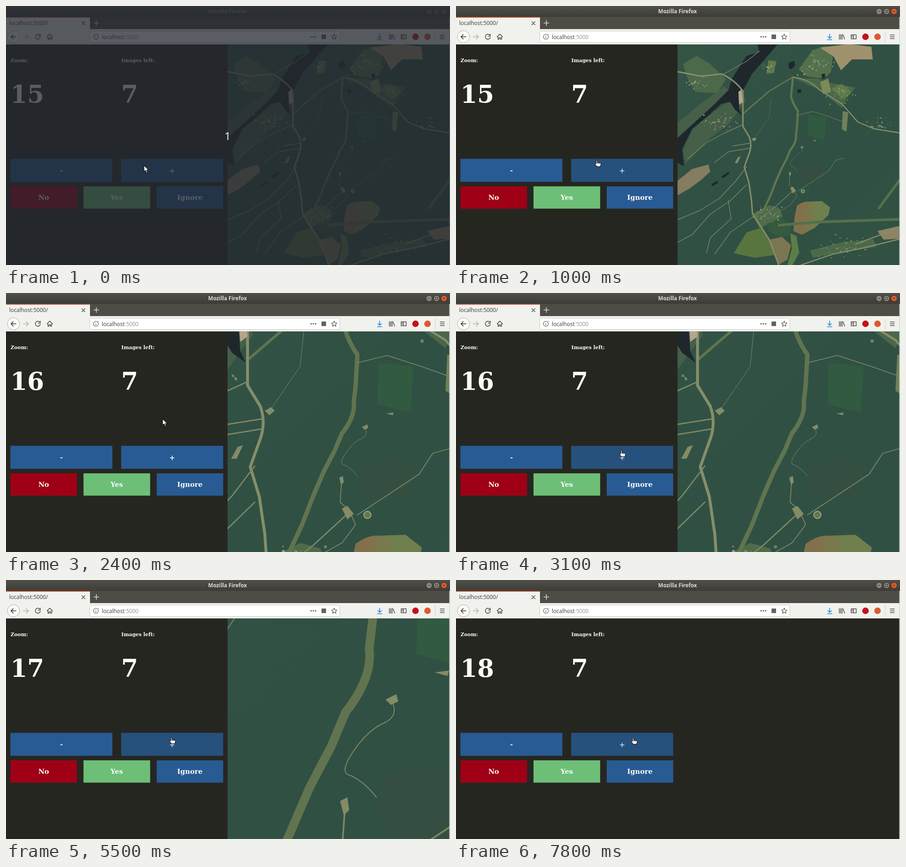
An HTML page for the animation above (8000 ms loop, 978x572 px).

```html
<!DOCTYPE html>
<html lang="en">
<head>
<meta charset="utf-8">
<title>Image labelling</title>
<style>
  html, body { margin: 0; width: 100%; height: 100%; overflow: hidden; background: #262621; }
  svg { display: block; width: 978px; height: 572px; }
  text { font-family: "Open Sans", sans-serif; font-size: 12px; fill: #3a3a36; }
  .page text { font: bold 15px "DejaVu Serif", serif; fill: #fbfbf8; }
  .page .label { font-size: 11px; }
  .page .count { font-size: 53.33px; }
  .mid { text-anchor: middle; }
  .icons, .roads { fill: none; stroke-linecap: round; stroke-linejoin: round; }
  .icons { stroke: #50504c; stroke-width: 1.6; }
  .roads { stroke: #7f8863; stroke-width: 1.4; }
  .cursor { fill: #fff; stroke: #111; stroke-width: 1.1; stroke-linejoin: round; }
</style>
</head>
<body>
<svg viewBox="0 0 978 572">
  <defs>
    <linearGradient id="bar" x2="0" y2="1">
      <stop stop-color="#504f48"/><stop offset="1" stop-color="#3d3c37"/>
    </linearGradient>
    <linearGradient id="forest" x2="1" y2="1">
      <stop stop-color="#345446"/><stop offset=".5" stop-color="#305044"/><stop offset="1" stop-color="#315143"/>
    </linearGradient>
    <linearGradient id="meadow">
      <stop offset=".25" stop-color="#82704c"/><stop offset=".65" stop-color="#70804c"/>
    </linearGradient>
    <clipPath id="pane"><path d="M488 84H977V572H488Z"/></clipPath>
  </defs>

  <path fill="#262621" d="M0 0H978V572H0Z"/>

  <g id="map" clip-path="url(#pane)">
    <g id="land">
      <path fill="url(#forest)" d="M488 84H977V572H488Z"/>
      <path fill="#315a41" d="M776 241L815 245 812 296 775 287Z"/>
      <path fill="#344f41" d="M758 352L790 348 815 356 808 388 764 392 752 374Z"/>
      <path fill="#465f48" d="M488 290V258L540 215 590 178 604 188 560 226ZM632 188L638 210 600 262 562 290 506 348 500 318 522 270 584 222Z"/>
      <path fill="#4c694a" d="M500 128L530 110 560 128 595 162 575 192 528 190 510 160Z"/>
      <path fill="#53704c" d="M755 140L785 98 812 88 830 112 826 145 812 160 775 156Z"/>
      <path fill="#4b674a" d="M745 160L795 160 826 170 880 180 862 202 850 225 800 185Z"/>
      <path fill="#a0916d" d="M802 92L865 84 915 90 918 118 872 118 848 142 832 112Z"/>
      <path fill="#7c8a58" d="M802 168L820 160 826 190 808 194Z"/>
      <path fill="#5d7a47" d="M826 182L850 172 872 190 852 206ZM688 120L706 122 700 148 684 150Z"/>
      <path fill="#70815a" d="M852 232L864 235 860 278 850 272Z"/>
      <path fill="#857d62" d="M488 386L520 360 556 350 560 366 540 384 516 402 488 418Z"/>
      <path fill="url(#meadow)" d="M751 441Q765 431 776 432L806 431 824 445 820 462 790 490 762 505 743 497 746 465Z"/>
      <path fill="#4f6b49" d="M652 460L690 440 712 446 720 465 690 482 668 490Z"/>
      <path fill="#36593f" d="M684 482L715 467 738 483 735 505 715 513 690 498Z"/>
      <path fill="#587540" d="M640 500L672 490 698 532 702 550 658 556 612 546Z"/>
      <path fill="#7b7650" d="M690 516L718 510 738 528 730 560 712 570 700 545Z"/>
      <path fill="#5c7d45" d="M736 502L750 508 756 545 740 574 730 572 740 535Z"/>
      <path fill="#8e8462" d="M928 497L976 486V514L942 516Z"/>
      <path fill="#4c6a4a" d="M780 540L850 522 920 515 926 532 840 545 786 556Z"/>
      <path fill="#1f272c" d="M664 84H709L690 106 652 150 635 182 622 200 624 228 630 241 615 230 604 212 584 216 560 238 520 272 498 316 502 354 488 346V292L530 253 565 221 600 186 608 160 640 110 668 102Z"/>
      <g id="specks"></g>
      <g class="roads">
        <path stroke="#54704c" stroke-width="6" d="M712 484L800 477 976 471M932 446L976 386"/>
        <path stroke="#61744f" stroke-width="4.8" d="M742 158L738 200Q743 218 753 232L751 267 749 284Q751 300 736 319L728 338 716 361 704 389 692 420 678 450 660 462"/>
        <path stroke="#61744f" stroke-width="3" d="M632 238L690 188 742 157"/>
        <path stroke="#858e6a" stroke-width="3.2" d="M488 145L540 155 585 150Q615 164 632 188L632 266 646 289Q653 308 645 328L635 356 645 389 651 430 653 458 690 516 711 572"/>
        <path stroke="#858e6a" stroke-width="2.4" d="M742 157Q780 162 800 185L850 216 885 256 920 271 976 280M760 572L830 548 890 536 976 515M880 526L976 490"/>
        <path d="M590 150L640 122 668 100M632 262L590 281 550 303 510 338M610 309L648 303M648 314L600 322 570 345M640 355L615 388 580 425 536 452 488 472M640 395L604 430 560 460 520 505 488 522M600 430L606 470 560 512 552 545M655 465L604 500 570 548M670 470L705 442 742 408"/>
        <path stroke-width=".9" d="M753 241L786 233 826 246 854 256M753 409L791 384 821 364 836 341 854 336M736 367L734 395 744 404 751 420 736 440 700 460"/>
        <path stroke-width=".5" d="M761 312Q766 321 757 325T740 341 739 354Q747 358 753 366M656 295L690 245 694 205"/>
      </g>
      <g fill="#848b65">
        <path d="M651 294L658 290 662 294 656 299ZM736 402L742 399 749 408 742 414ZM733 368L737 366 738 373 735 376Z"/>
        <path d="M758 312L764 309 765 313 761 315ZM614 347L621 334 627 332 620 347ZM785 297L793 296 792 299Z"/>
        <circle cx="764" cy="409" r="4" fill="#61794f" stroke="#a0a98a"/>
      </g>
      <path fill="#b3a68c" d="M622 190L629 184 632 212 624 218Z"/>
      <path fill="#1f2a2c" d="M733 125L745 121 747 132 738 140 732 136ZM751 185L759 183 761 191 753 193ZM805 150L812 149 814 158 807 161ZM562 394L574 386 578 390 565 398ZM584 377L600 366 603 370 589 380Z"/>
    </g>
  </g>

  <g class="page">
    <text class="label" x="10" y="123.5">Zoom:</text>
    <text class="label" x="254" y="123.5">Images left:</text>
    <text class="count" id="zoom" x="9.75" y="213.5">15</text>
    <text class="count" x="253.75" y="213.5">7</text>
    <path fill="#285b94" d="M9.700 337.600H234.300V388.300H9.700ZM332 398.200H478.400V447.500H332Z"/>
    <path id="plus" d="M253.700 337.600H478.400V388.300H253.700Z"/>
    <path fill="#9f0016" d="M9.700 398.200H156.400V447.500H9.700Z"/>
    <path fill="#6dbf77" d="M170.700 398.200H317.500V447.500H170.700Z"/>
    <g class="mid">
      <text x="122" y="368">-</text>
      <text id="sign" x="366" y="368.5">+</text>
      <text x="83" y="427.5">No</text>
      <text x="244" y="427.5">Yes</text>
      <text x="405" y="427.5">Ignore</text>
    </g>
  </g>

  <path fill="url(#bar)" d="M0 0H978V24H0Z"/>
  <path fill="#4d4c45" d="M0 24H978V51H0Z"/>
  <path fill="#f1f2ee" d="M0 25H185V51H978V84H0Z"/>
  <path fill="#e8704a" d="M0 24.5H185V26H0Z"/>
  <path fill="#cfcfca" d="M0 84H978V85H0Z"/>
  <text class="mid" id="title" x="488" y="15.7" style="font-weight:700;font-size:11.75px">Mozilla Firefox</text>
  <g id="controls" stroke="#34332f">
    <circle cx="932" cy="12" r="6.5"/><circle cx="948.5" cy="12" r="6.5"/><circle id="close" cx="965" cy="12" r="6.5"/>
    <path fill="none" d="M929 12H935M946 9.500H951V14.500H946ZM962.800 9.800L967.200 14.200M967.200 9.800L962.800 14.200"/>
  </g>
  <text x="7" y="42">localhost:5000/</text>
  <rect x="184.5" y="55.5" width="551" height="25" rx="2" fill="#fff" stroke="#c8c8c2"/>
  <text x="211" y="72.5">localhost<tspan fill="#8e8e8a">:5000</tspan></text>
  <g class="icons">
    <path d="M167 34.500L174 41.500M174 34.500L167 41.500"/>
    <path stroke="#d6d5ce" d="M193.500 37.500H204.500M199 32V43"/>
    <circle cx="16.5" cy="68" r="13.5" fill="#fafaf8" stroke="#aaa9a4" stroke-width="1"/>
    <path stroke="#33332f" d="M22 68H11M16 63L11 68 16 73"/>
    <path stroke="#b2b2ad" d="M38 68H49M44.500 63L49.500 68 44.500 73"/>
    <path d="M74 64A5.500 5.500 0 1 0 75.500 69M75.500 62V66.500H71"/>
    <path d="M90.500 68L96.500 62 102.500 68M92.500 68V73.500H95V70H98V73.500H100.500V68"/>
    <g stroke-width="1.1">
      <circle cx="198" cy="68" r="5.5"/><path d="M198 67.500V71M198 65V65.200M203 62.500H204"/>
    </g>
    <path stroke-width="3" d="M672 68H672.100M677 68H677.100M682 68H682.100"/>
    <path fill="#62625e" stroke="none" d="M695 63H705V73H695Z"/>
    <path stroke-width="1.2" d="M723 62L724.800 66 729 66.400 725.800 69.300 726.800 73.500 723 71.200 719.200 73.500 720.200 69.300 717 66.400 721.200 66Z"/>
    <path stroke="#1b84e0" d="M823 62V71M819 67.500L823 71.500 827 67.500M818 74.500H828"/>
    <path d="M844.500 63V73.500M847.500 63V73.500M850.500 63V73.500M852.500 63.500L856 73"/>
    <path d="M870.500 63.500H881.500V72.500H870.500ZM875.500 63.500V72.500M872.500 66H873.500M872.500 68.500H873.500"/>
    <path stroke="#d0d0cb" stroke-width="1" d="M945.500 56V80"/>
    <path d="M956.500 64H965.500M956.500 68H965.500M956.500 72H965.500"/>
  </g>
  <circle cx="902" cy="68" r="7.2" fill="#c3131b"/>
  <circle cx="928.5" cy="68" r="7.2" fill="#de5833"/>
  <path fill="#d9d9d5" d="M976.500 24H978V572H976.500Z"/>

  <g id="dim">
    <path fill="#23272f" opacity=".75" d="M0 0H978V572H0Z"/>
    <text class="mid" x="488" y="295.5" style="font-size:24px;fill:#fff">1</text>
  </g>
  <path id="arrow" class="cursor" d="M0 0V14L3.300 11 5.700 16.500 8 15.500 5.700 10.200H10Z"/>
  <g id="hand" class="cursor">
    <path d="M3 8V1.500Q4.200 0 5.500 1.500V5.500L12 6.500Q13.500 7 13.300 9L12 14.500H4.500L.5 9.500Q.5 7.500 3 8Z"/>
    <path fill="none" d="M5.500 5.500V8M8 6V8.500M10.500 6.500V8.500"/>
  </g>
</svg>
<script>
const $ = id => document.getElementById(id);
const show = (id, on) => $(id).style.display = on ? '' : 'none';
const fill = (id, color) => $(id).style.fill = color;

// start time, pointer shape, position
const pointer = [
  [0, 'arrow', 304, 352], [400, 'hand', 299, 351], [900, 'hand', 303, 345],
  [1000, 'hand', 306, 340], [2300, 'arrow', 321, 328], [2400, 'arrow', 345, 278],
  [2600, 'arrow', 352, 290], [2700, 'arrow', 358, 308], [2800, 'arrow', 364, 324],
  [2900, 'hand', 361, 338], [3100, 'hand', 360, 347], [5700, 'hand', 374, 348],
  [5800, 'hand', 386, 348]
];

// Settlements: centre, spread and number of buildings
let seed = 7;
const rand = () => (seed = seed * 16807 % 2147483647) / 2147483647;
const towns = [
  [580, 255, 42, 45], [525, 170, 32, 25], [790, 130, 45, 45], [845, 195, 40, 35],
  [685, 460, 36, 40], [850, 535, 60, 40], [930, 265, 40, 25], [690, 135, 24, 20]
];
for (const [x, y, spread, count] of towns)
  for (let i = 0; i < count; i++) {
    const dot = document.createElementNS('http://www.w3.org/2000/svg', 'circle');
    const dx = (rand() - rand()) * spread, dy = (rand() - rand()) * spread * .6;
    dot.setAttribute('cx', x + dx);
    dot.setAttribute('cy', y + dy);
    dot.setAttribute('r', .7 + rand() * 1.2);
    dot.setAttribute('fill', rand() < .4 ? '#a09c7e' : '#6d8560');
    $('specks').append(dot);
  }

function draw(now) {
  const t = now % 8000;
  const zoom = 15 + [2400, 5100, 7800].filter(click => t >= click).length;
  const loading = t >= 5100 && t < 5500 || t >= 7800;
  const [, shape, x, y] = pointer.findLast(step => t >= step[0]);
  const hover = shape === 'hand', focused = t >= 900;

  $('zoom').textContent = zoom;
  show('map', !loading);
  $('land').setAttribute('transform', `translate(732 328) scale(${2 ** (zoom - 15)}) translate(-732 -328)`);
  show('dim', t < 400);
  show('arrow', !hover);
  show('hand', hover);
  $(shape).setAttribute('transform', `translate(${x} ${y})`);
  fill('plus', hover ? '#26517c' : '#285b94');
  fill('sign', hover ? '#ccd6df' : '#fbfbf8');
  fill('title', focused ? '#dfdbd2' : '#88867f');
  fill('controls', focused ? '#8b887f' : '#6a6961');
  fill('close', focused ? '#ea5a2c' : '#6a6961');
  requestAnimationFrame(draw);
}
requestAnimationFrame(draw);
</script>
</body>
</html>
```
